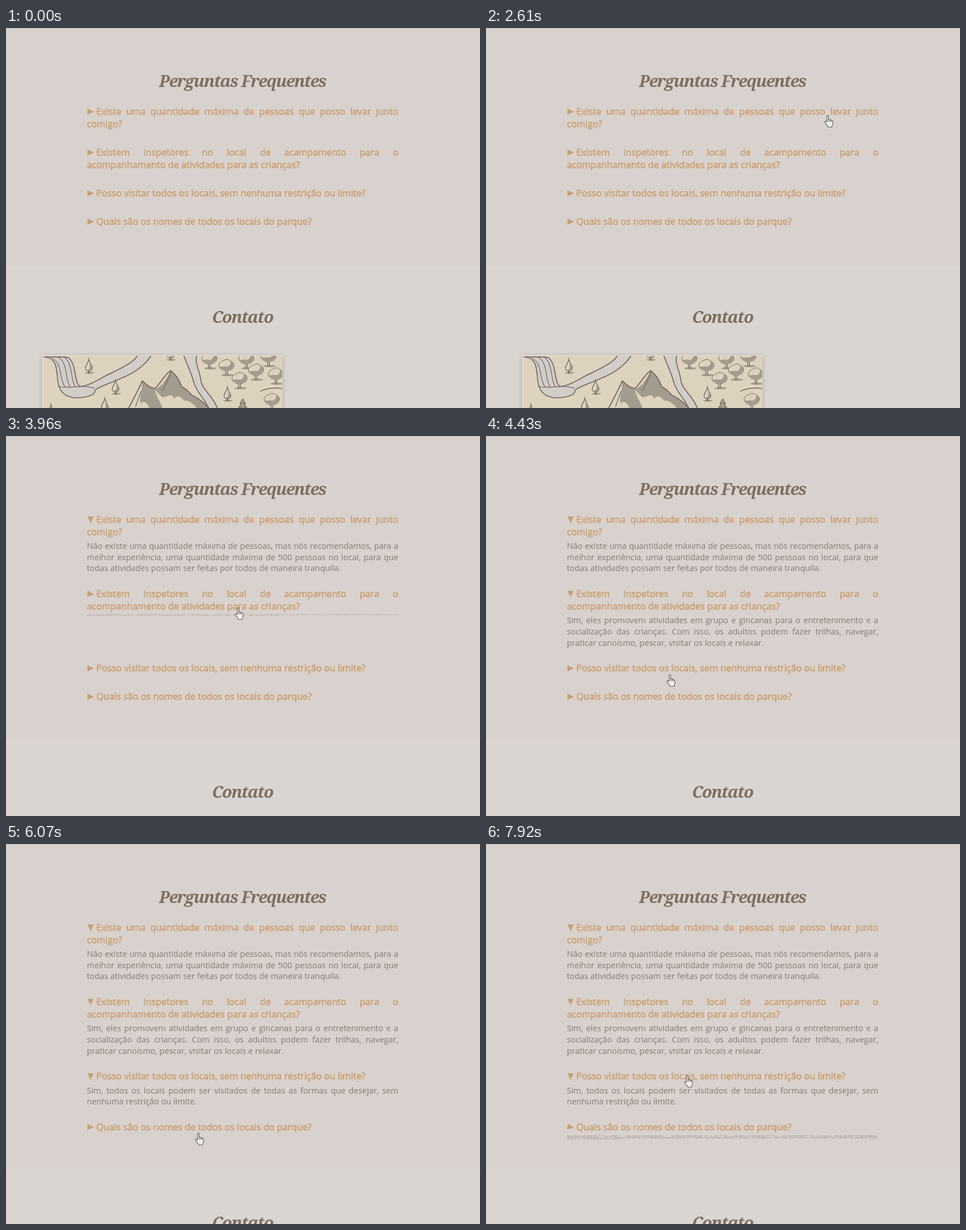
Animation, 835 px wide and 670 px high, one loop 8000 ms. Source, as an HTML page with a canvas:

```html
<!DOCTYPE html>
<html lang="pt-BR">
<head>
<meta charset="utf-8">
<title>Perguntas Frequentes</title>
<style>
html, body { margin: 0; width: 100%; height: 100%; overflow: hidden; background: #d9d1cd; }
canvas { display: block; width: 835px; height: 670px; }
</style>
</head>
<body>
<canvas id="stage" width="835" height="670"></canvas>
<script>
const ctx = document.getElementById('stage').getContext('2d');
const LOOP = 8000, LEFT = 142.5, RIGHT = 691, LINE = 19.7;
const TITLE_FONT = 'italic 600 29px "Noto Serif", serif';
const ASK_FONT = '16.2px "Open Sans", sans-serif';
const ANSWER_FONT = '14.4px "Open Sans", sans-serif';
const INK = '#75675c', STONE = '#a39b8d', SAND = '#ddd2be', WATER = '#d3cdca';

// y: baseline while everything is closed; steps: [time, unfolded share, takes up space]
const faq = [
  { y: 153,
    ask: ['Existe uma quantidade máxima de pessoas que posso levar junto', 'comigo?'],
    answer: ['Não existe uma quantidade máxima de pessoas, mas nós recomendamos, para a',
      'melhor experiência, uma quantidade máxima de 500 pessoas no local, para que',
      'todas atividades possam ser feitas por todos de maneira tranquila.'],
    steps: [[3010, .12, 1], [3125, .75, 1], [3240, 1, 1]] },
  { y: 225,
    ask: ['Existem inspetores no local de acampamento para o',
      'acompanhamento de atividades para as crianças?'],
    answer: ['Sim, eles promovem atividades em grupo e gincanas para o entretenimento e a',
      'socialização das crianças. Com isso, os adultos podem fazer trilhas, navegar,',
      'praticar canoísmo, pescar, visitar os locais e relaxar.'],
    steps: [[3960, .04, 1], [4130, .8, 1], [4260, 1, 1]] },
  { y: 297,
    ask: ['Posso visitar todos os locais, sem nenhuma restrição ou limite?'],
    answer: ['Sim, todos os locais podem ser visitados de todas as formas que desejar, sem',
      'nenhuma restrição ou limite.'],
    steps: [[5270, .22, 1], [5440, .95, 1], [5640, 1, 1]] },
  { y: 347,
    ask: ['Quais são os nomes de todos os locais do parque?'],
    answer: ['Cachoeira do Alvorecer, Cachoeira das Cachoeiras, Floresta do Entardecer,',
      'Floresta das Orquídeas, Floresta da Meia-Noite, Floresta Verdejante, Lago',
      'Dourado, Lago dos Vagalumes, Lago da Névoa, Lago das Aves, Lago das Pedras,',
      'Montanhas Gêmeas, Montanha do Dragão, Montanha das Nuvens e Montanha',
      'dos Sussurros.'],
    steps: [[6500, .3, 1], [6730, 1, 1], [7920, .075, 0]] }
];

// time, x, y, shape, glides on to the next key
const pointer = [
  [1410, 832, 112, 'arrow', 1], [1700, 690, 132, 'hand', 1], [2000, 596, 153, 'hand'],
  [3010, 596, 153, 'hand', 1], [3240, 417, 304, 'hand', 1], [3700, 403, 302, 'hand'],
  [4130, 375, 345, 'hand'], [4260, 320, 412, 'hand'], [4430, 318, 420, 'hand'],
  [4560, 308, 417, 'hand'], [4730, 309, 417, 'hand'],
  [5440, 314, 453, 'ibeam'], [5640, 315, 524, 'hand'], [5870, 325, 514, 'hand'],
  [6070, 333, 509, 'hand'], [6730, 335, 573, 'ibeam'], [7090, 337, 571, 'ibeam'],
  [7290, 339, 504, 'hand'], [7490, 345, 503, 'hand'], [7720, 344, 502, 'hand'],
  [7920, 349, 407, 'hand']
];

const shapes = {
  hand: new Path2D('M4.5 13V2.2C4.5 .4 7.3 .4 7.3 2.2V8.5C8.5 7.5 9.8 8 10 9.2C11 8.4 12.3 9 12.4 10.2C13.6 9.6 14.8 10.3 14.8 11.6V15.5C14.8 18 13.4 19 13.2 21.5H6.3C6 19 2.5 16.5 .9 13.2C.2 11.6 2.2 10.8 3.2 12Z'),
  fingers: new Path2D('M7.3 9v3M10 9.5v2.7M12.4 10.5v2'),
  arrow: new Path2D('M0 0V16L4 12.5L6.5 18L9 17L6.5 11.5H11.5Z'),
  ibeam: new Path2D('M2 .5Q5 .5 5 2.5V13Q5 15 2 15M8 .5Q5 .5 5 2.5M5 13Q5 15 8 15M3.5 10h3')
};

const river = new Path2D('M66 580C90 581 89 600 91 620C92 636 100 650 122 652C140 652 156 648 157 640C156 634 190 625 215 612C235 602 248 590 256 577L232 577C226 590 198 602 174 614C158 623 144 631 130 632C120 625 124 595 112 583C108 579 100 580 66 580Z');
const strands = new Path2D('M80 582C100 588 94 622 104 633M92 581C110 590 104 622 113 633M102 580C119 592 113 620 122 632M94 632C108 637 140 627 156 636');
const stream = new Path2D('M313 577C322 600 326 608 330 622C335 642 350 652 360 676L374 676C368 652 348 640 344 625C341 601 332 592 336 577Z');
const peaks = new Path2D('M213 676C222 658 233 640 240 622C246 628 254 634 262 636C270 630 278 612 290 604C300 612 306 622 309 632C318 636 324 644 328 648C340 652 352 664 362 676Z');
const slopes = new Path2D('M290 604C299 612 306 622 309 632C318 636 324 644 328 648C340 652 350 660 358 670H336C330 662 322 656 314 657C308 650 300 646 296 654C290 640 282 654 274 650C270 646 266 642 262 637C272 634 282 622 290 604ZM240 622C246 628 254 634 262 637C264 648 270 656 276 670H252C250 660 242 656 237 662C234 650 241 640 240 622Z');
const ridge = new Path2D('M290 606C286 622 278 632 276 640M238 640L228 668M447 641Q465 632 488 636');

const lastBefore = (keys, t) => keys.filter(k => k[0] <= t).pop();

function lines(rows, x, y, step, put) {
  rows.forEach((row, i) => {
    const start = i ? LEFT : x, words = row.split(' ');
    const space = ctx.measureText(' ').width;
    const spare = RIGHT - start - ctx.measureText(row).width;
    const gap = i < rows.length - 1 ? space + spare / (words.length - 1) : space;
    let at = start;
    for (const word of words) {
      put(word, at, y + i * step);
      at += ctx.measureText(word).width + gap;
    }
  });
}

function title(text, y) {
  ctx.font = TITLE_FONT;
  ctx.letterSpacing = '-1.5px';
  ctx.textAlign = 'center';
  ctx.fillStyle = '#7d6e61';
  ctx.fillText(text, 416.5, y);
  ctx.letterSpacing = '0px';
  ctx.textAlign = 'left';
}

function question(item, y, share) {
  ctx.fillStyle = ctx.strokeStyle = '#c9a072';
  ctx.save();
  ctx.translate(149, y - 5.5);
  ctx.rotate(Math.PI / 2 * Math.min(1, share * 1.5));
  ctx.fill(new Path2D('M6 0L-5.5 -5.5V5.5Z'));
  ctx.restore();
  ctx.font = ASK_FONT;
  ctx.lineWidth = .6;
  lines(item.ask, 159, y, 21.7, (word, x, base) => {
    ctx.fillText(word, x, base);
    ctx.strokeText(word, x, base);
  });
}

function answer(item, y, share) {
  if (!share) return;
  ctx.save();
  ctx.translate(0, y - 15.4);
  ctx.scale(1, share);
  ctx.font = ANSWER_FONT;
  ctx.fillStyle = '#857a74';
  lines(item.answer, LEFT, 15.4, LINE, (word, x, base) => ctx.fillText(word, x, base));
  ctx.restore();
}

function inked(path, fill, width = 1.3) {
  ctx.lineWidth = width;
  ctx.strokeStyle = INK;
  if (fill) { ctx.fillStyle = fill; ctx.fill(path); }
  ctx.stroke(path);
}

function oval(x, y, rx, ry, fill) {
  ctx.beginPath();
  ctx.ellipse(x, y, rx, ry, 0, 0, 7);
  ctx.fillStyle = fill;
  ctx.fill();
}

function plant(x, y, draw) {
  ctx.save();
  ctx.translate(x, y);
  draw();
  ctx.restore();
}

const drop = () => {
  oval(1, 11, 8, 1.8, STONE);
  inked(new Path2D('M0 6V12'), null, 2.4);
  inked(new Path2D('M0 -13C1 -6 6 -2 6 3C6 9 -6 9 -6 3C-6 -2 -1 -6 0 -13Z'), SAND);
  ctx.fillStyle = STONE;
  ctx.fill(new Path2D('M1 -8C1 -3 5 -1 5 3C5 7 0 7 -2 6C4 3 1 -2 1 -8Z'));
};

const roundTree = () => {
  oval(2, 16, 11, 2, STONE);
  inked(new Path2D('M-3 7Q0 10 -1 16M4 7Q1 10 2 16'));
  inked(new Path2D('M-13 0C-14 -7 -7 -8 -4 -10C1 -14 7 -10 9 -8C14 -7 15 0 12 3C8 9 4 6 0 8C-5 8 -11 6 -13 0Z'), SAND, 1);
  ctx.fillStyle = STONE;
  ctx.fill(new Path2D('M8 -8C14 -6 14 0 11 3C7 8 4 5 0 7C-5 7 -10 5 -13 0C-7 3 -5 -1 -1 1C4 2 8 -2 8 -8Z'));
};

const pine = () => inked(new Path2D('M0 -10L5 -2H2L7 5H3L9 13H-9L-3 5H-7L-2 -2H-5Z'), STONE, 1.2);

function map(shift) {
  ctx.save();
  ctx.translate(0, shift);
  ctx.shadowColor = 'rgba(90,75,65,.35)';
  ctx.shadowBlur = 7;
  ctx.shadowOffsetY = 1;
  ctx.fillStyle = '#ebe5db';
  ctx.fillRect(64, 577, 423, 300);
  ctx.shadowColor = 'transparent';
  ctx.beginPath();
  ctx.rect(65.5, 578, 421, 298);
  ctx.clip();
  ctx.fillStyle = SAND;
  ctx.fillRect(64, 577, 423, 300);
  inked(river, WATER, 1.7);
  inked(strands);
  inked(stream, WATER, 1.7);
  inked(peaks, SAND);
  ctx.fillStyle = STONE;
  ctx.fill(slopes);
  inked(peaks, null, 1.7);
  inked(ridge);
  for (const [x, y] of [[146, 597], [193, 634], [290, 574], [174, 666], [79, 677], [390, 646]])
    plant(x, y, drop);
  for (const [x, y] of [[358, 584], [423, 584], [462, 580], [388, 596], [440, 604], [411, 619], [475, 611], [468, 656]])
    plant(x, y, roundTree);
  plant(417, 664, pine);
  ctx.restore();
}

function cursor(t) {
  const key = lastBefore(pointer, t);
  if (!key) return;
  let [start, x, y, shape, glides] = key;
  if (glides) {
    const next = pointer[pointer.indexOf(key) + 1];
    const p = (t - start) / (next[0] - start);
    x += (next[1] - x) * p;
    y += (next[2] - y) * p;
  }
  ctx.save();
  ctx.translate(x, y);
  ctx.lineJoin = 'round';
  ctx.strokeStyle = '#5e5854';
  ctx.lineWidth = 1.1;
  ctx.fillStyle = '#f1eeec';
  if (shape !== 'ibeam') ctx.fill(shapes[shape]);
  ctx.stroke(shapes[shape]);
  if (shape === 'hand') ctx.stroke(shapes.fingers);
  ctx.restore();
}

function draw(t) {
  ctx.fillStyle = '#d9d1cd';
  ctx.fillRect(0, 0, 835, 670);
  ctx.fillStyle = '#c9c1bd';
  ctx.fillRect(0, 0, 835, 1);
  title('Perguntas Frequentes', 103.5);

  let shift = 0;
  for (const item of faq) {
    const [, share, room] = lastBefore(item.steps, t) || [0, 0, 0];
    const y = item.y + shift;
    question(item, y, share);
    answer(item, y + (item.ask.length - 1) * 21.7 + 24.3, share);
    shift += room * item.answer.length * LINE;
  }

  ctx.fillStyle = '#dad5d1';
  ctx.fillRect(0, Math.round(417.5 + shift), 835, 670);
  title('Contato', 520 + shift);
  map(shift);
  cursor(t);
}

function tick() {
  draw(performance.now() % LOOP);
  requestAnimationFrame(tick);
}
tick();
</script>
</body>
</html>
```
